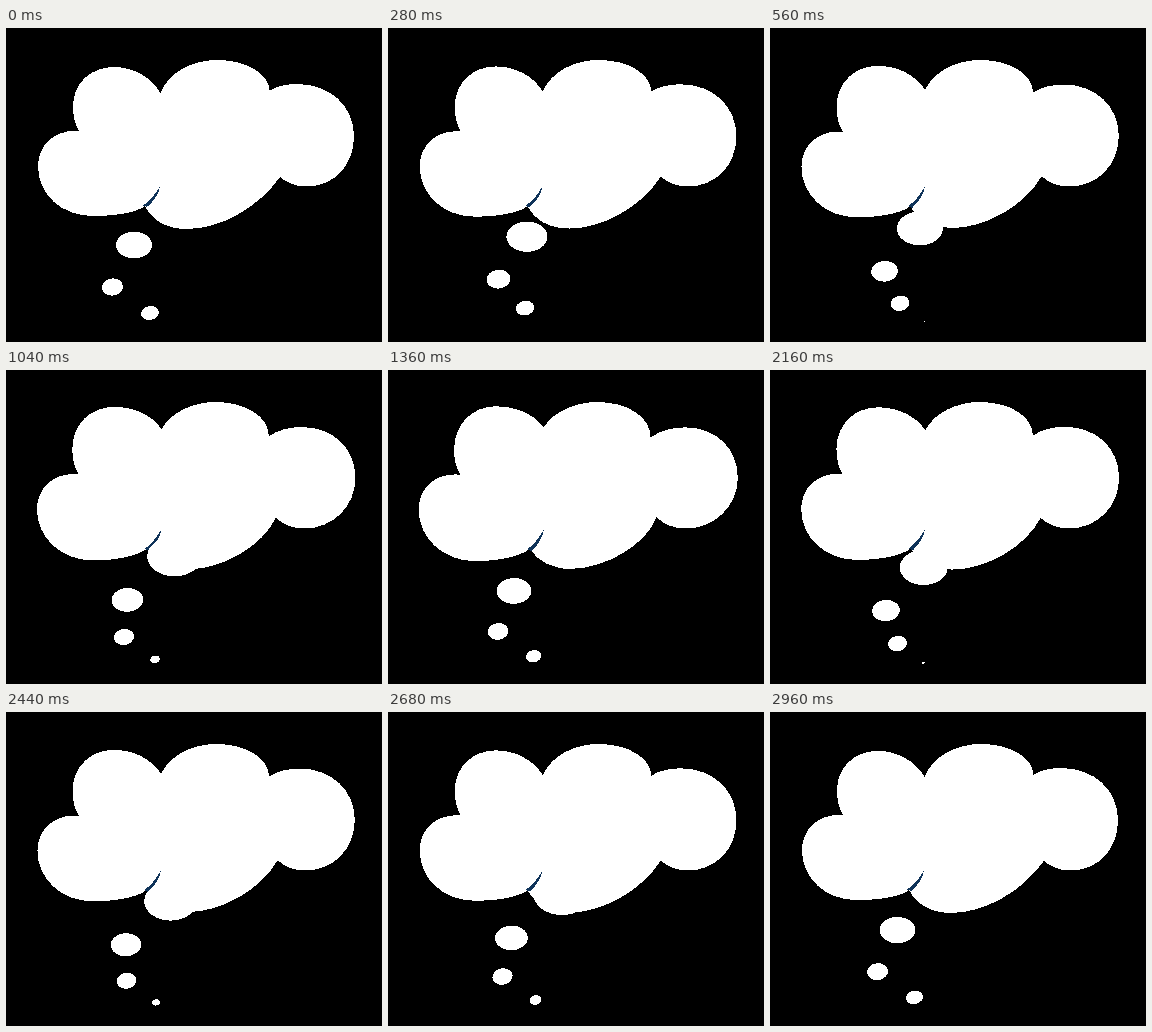
Recreate the animation shown at these times as an HTML page. Size 376 by 314 pixels, loop 3000 ms.

```html
<!DOCTYPE html>
<html lang="en">
<head>
<meta charset="utf-8">
<title>Thought bubble</title>
<style>
  html, body { margin: 0; width: 100%; height: 100%; overflow: hidden; background: #000; }
  svg { display: block; width: 376px; height: 314px; }
</style>
</head>
<body>
<svg viewBox="0 0 376 314" shape-rendering="crispEdges">
  <path id="cloud" fill="#fff"/>
  <path id="crease" fill="#10345a"/>
  <g id="bubbles" fill="#fff"></g>
</svg>
<script>
const LOOP = 3000, STEP = 40, CYCLE = 1500;

// Each shape is given at rest and fully swollen.
const cloudRest = `M73,103 C69,97 67,88 67,78 C67,55 85,39 108,39 C127,39 145,49 154.5,65
  C163,44 186,32 211,32 C241,32 263,46 263.5,62.5
  C271,58 281,56 291,56 C324,56 348,78 348,108 C348,138 328,158.5 300,158.5 C290,158.5 281,155 274,149
  C252,180 214,201 181,201 C160,201 146,192 139,178
  C130,185 108,188 87,188 C55,188 32,166 32,138 C32,117 49,101 73,103 Z`;
const cloudFull = `M72.5,105 C68,98 66,90 66,80 C66,53 85,36 108,36 C128,36 146,43 156,56.5
  C165,42 187,32 209,32 C239,32 263,47 262.5,68
  C272,61 284,57.5 298,57.5 C328,57.5 350,78 350,108 C350,136 326,158.5 298,158.5 C286,158.5 276,155 268,147
  C259,174 218,198.5 183,198.5 C165,198.5 151,192 142,179
  C133,186 112,191.5 87,191.5 C55,191.5 30.5,168 30.5,140 C30.5,117 49,102 72.5,105 Z`;
const creaseRest = 'M137,177.5 Q147.5,170.5 154,158 Q152.5,169 141,179 Z';
const creaseFull = 'M139.5,179.5 Q149.5,172 156,159.5 Q154.5,171 144,181.5 Z';

// Bubble stops one cycle apart: x, y, rx, ry, tilt. The first leg starts late.
const birth = 500;
const stops = [
  [155, 294.5, 0, 0, -15],
  [144, 285, 9, 7, -12],
  [106.5, 259, 10.5, 8.5, -8],
  [128, 217, 18, 13.3, 0],
  [186.5, 172.7, 31.5, 23, 0]
];

const mix = (a, b, k) => a + (b - a) * k;
const numbers = /\d+(\.\d+)?/g;

function morph(from, to, k) {
  const ends = to.match(numbers);
  let i = 0;
  return from.replace(numbers, n => mix(+n, +ends[i++], k).toFixed(2));
}

const cloud = document.getElementById('cloud');
const crease = document.getElementById('crease');
const group = document.getElementById('bubbles');
const bubbles = stops.slice(1).map(() =>
  group.appendChild(document.createElementNS('http://www.w3.org/2000/svg', 'ellipse')));

function draw(time) {
  const t = Math.floor((time % LOOP) / STEP) * STEP;
  const swell = 1 - Math.abs(1 - t / CYCLE);
  cloud.setAttribute('d', morph(cloudRest, cloudFull, swell));
  crease.setAttribute('d', morph(creaseRest, creaseFull, swell));

  const phase = t % CYCLE;
  bubbles.forEach((bubble, leg) => {
    const k = leg ? phase / CYCLE : Math.max(0, (phase - birth) / (CYCLE - birth));
    const [x, y, rx, ry, tilt] = stops[leg].map((v, i) => mix(v, stops[leg + 1][i], k));
    bubble.setAttribute('rx', rx);
    bubble.setAttribute('ry', ry);
    bubble.setAttribute('transform', `translate(${x} ${y}) rotate(${tilt})`);
  });
}

const start = performance.now();
function tick() {
  draw(performance.now() - start);
  requestAnimationFrame(tick);
}
tick();
</script>
</body>
</html>
```
